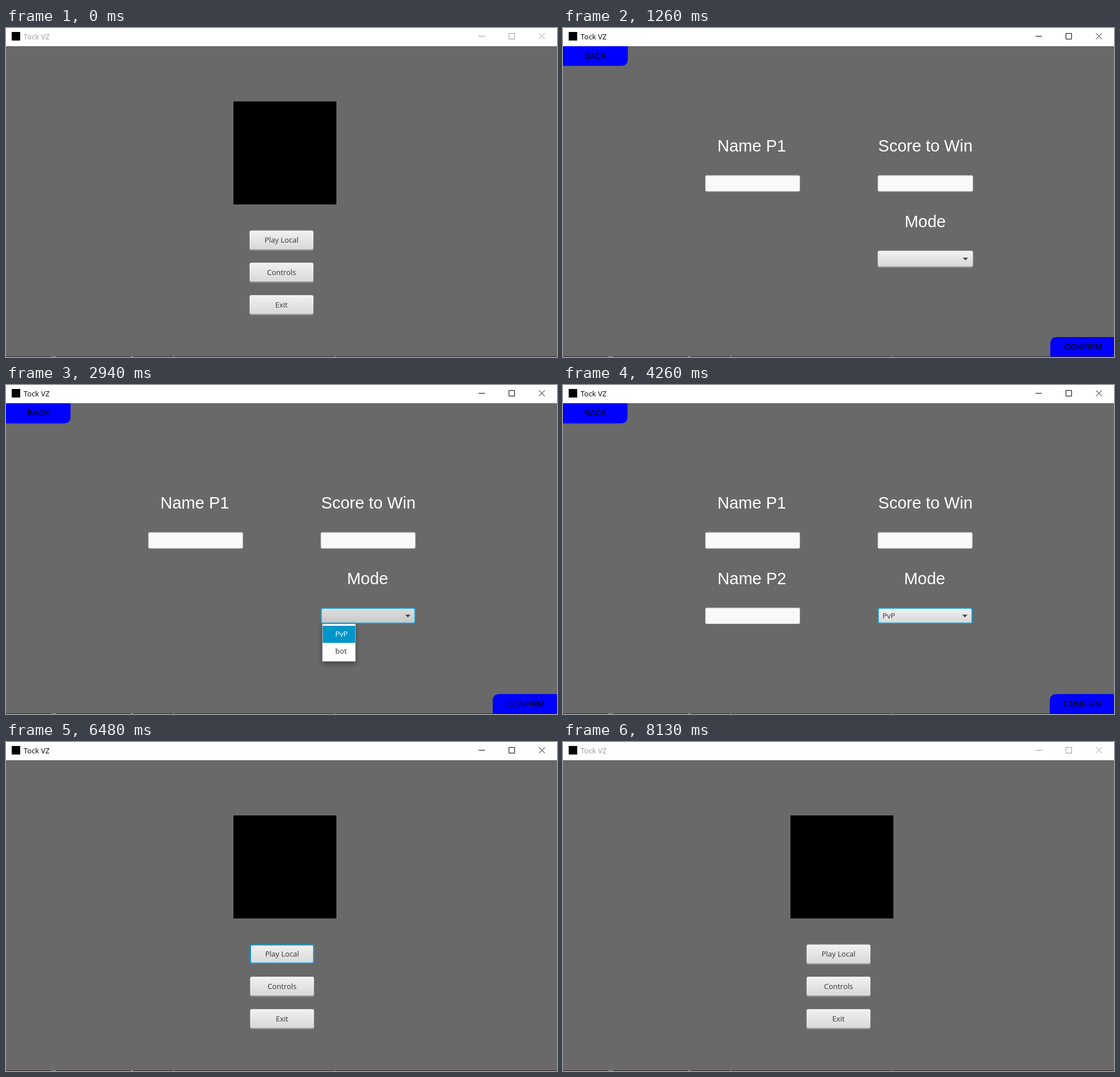
Write an HTML page that moves like this. It is 969 px wide and 578 px high and loops after 8.34 s.

```html
<!DOCTYPE html>
<html lang="en">
<head>
<meta charset="utf-8">
<title>Tock VZ</title>
<style>
  html, body { margin: 0; width: 100%; height: 100%; overflow: hidden; background: #696969; }
  svg { display: block; width: 969px; height: 578px; }
  text { font: 13px "Open Sans", "Noto Sans", sans-serif; fill: #333; }
  .mid { text-anchor: middle; }
  .label { font: 29px "Liberation Sans", Arial, sans-serif; fill: #fff; text-anchor: middle; }
  .corner { font: 14.3px "Liberation Sans", Arial, sans-serif; fill: #000; text-anchor: middle; }
</style>
</head>
<body>
<svg viewBox="0 0 969 578">
  <defs>
    <linearGradient id="normal" x2="0" y2="1"><stop stop-color="#f0f0f0"/><stop offset="1" stop-color="#d9d9d9"/></linearGradient>
    <linearGradient id="hover" x2="0" y2="1"><stop stop-color="#f2f2f2"/><stop offset="1" stop-color="#dcdcdc"/></linearGradient>
    <linearGradient id="pressed" x2="0" y2="1"><stop stop-color="#dcdcdc"/><stop offset="1" stop-color="#cacaca"/></linearGradient>
    <linearGradient id="rim" x2="0" y2="1"><stop stop-color="#fcfcfc"/><stop offset="1" stop-color="#e4e4e4"/></linearGradient>
    <linearGradient id="edge" x2="0" y2="1"><stop stop-color="#c4c4c4"/><stop offset="1" stop-color="#a9a9a9"/></linearGradient>
    <filter id="drop" x="-30%" y="-30%" width="160%" height="160%">
      <feDropShadow dx="0" dy="4" stdDeviation="4" flood-color="#000" flood-opacity=".4"/>
    </filter>
  </defs>
  <g id="stage"></g>
</svg>
<script>
const LOOP = 8340;
const stage = document.getElementById('stage');

// Each entry holds from its start time until the next one.
const scenes = [
  [0,    { screen: 'menu' }],
  [660,  { screen: 'menu', tone: 'hover' }],
  [1020, { screen: 'menu', active: true, focus: 'play', tone: 'pressed' }],
  [1260, { screen: 'setup', active: true, focus: 'back', nudge: 1 }],
  [1290, { screen: 'setup', active: true, focus: 'back' }],
  [2460, { screen: 'setup', active: true, focus: 'back', tone: 'hover' }],
  [2730, { screen: 'setup', active: true, focus: 'mode', tone: 'hover' }],
  [2940, { screen: 'setup', active: true, focus: 'mode', tone: 'pressed', open: true }],
  [4260, { screen: 'setup', active: true, focus: 'mode', mode: 'PvP' }],
  [6270, { screen: 'setup', active: true, focus: 'back', mode: 'PvP' }],
  [6480, { screen: 'menu', active: true, focus: 'play', nudge: 1 }],
  [6510, { screen: 'menu', active: true, focus: 'play' }],
  [8130, { screen: 'menu' }]
];

const rect = (x, y, w, h, fill, r = 0) =>
  `<rect x="${x}" y="${y}" width="${w}" height="${h}" rx="${r}" fill="${fill}"/>`;
const text = (x, y, str, cls = '', fill = '') =>
  `<text x="${x}" y="${y}" class="${cls}"${fill && ` style="fill:${fill}"`}>${str}</text>`;

function panel(x, y, w, h, tone = 'normal', focused = false) {
  if (focused) {
    return rect(x - .5, y - .5, w + 1, h + 1, 'rgba(3,158,211,.3)', 4) +
      rect(x + .3, y + .3, w - .6, h - .6, '#119fd0', 3) +
      rect(x + 2, y + 2, w - 4, h - 4, `url(#${tone})`, 1.5);
  }
  return rect(x, y + 1, w, h + .8, '#8f8f8f', 3.5) +
    rect(x, y, w, h, 'url(#edge)', 3.5) +
    rect(x + 1, y + 1, w - 2, h - 2, 'url(#rim)', 2.5) +
    rect(x + 2, y + 2, w - 4, h - 4, `url(#${tone})`, 2);
}

const field = (x, y, w) =>
  rect(x, y, w, 29, '#bdbdbd', 3) + rect(x + 1, y + 1, w - 2, 27, '#ececec', 2) +
  rect(x + 1, y + 2, w - 2, 26, '#f9f9f9', 2);

function chrome(active) {
  const ink = active ? '#000' : '#999';
  return rect(0, 0, 969, 32, '#fff') +
    rect(10, 7, 15, 15, '#000') +
    text(31, 20, 'Tock VZ', '', ink) +
    `<path d="M831 14.5h11M884.5 9.5h10v10h-10zM937.5 9.5l10 10m0-10l-10 10" fill="none" stroke="${ink}"/>`;
}

const desktopEdge = () =>
  rect(0, 577, 969, 1, '#30222a') +
  [[80, 8], [220, 4], [294, 2], [577, 2]].map(([x, w]) => rect(x, 577, w, 1, '#999')).join('');

function menu({ focus, tone, nudge = 0 }) {
  const x = 428 + nudge;
  const buttons = ['Play Local', 'Controls', 'Exit'].map((name, i) => {
    const y = [355.5, 412, 469][i];
    const first = i === 0;
    return panel(x, y, 113, 34, first ? tone : 'normal', first && focus === 'play') +
      text(x + 56.5, [377, 433.5, 490.5][i], name, 'mid');
  });
  return rect(400, 129, 181, 181, '#000') + buttons.join('');
}

function setup({ focus, tone, nudge = 0, mode, open }) {
  const back = focus === 'back' ? [114, 66.5] : [113.5, 67.5];
  const left = 856 + nudge;
  const w = 167 + nudge;
  const arrow = 702 + nudge;
  return `<path d="M0 32H${back[0]}V${back[1] - 12}q0 12 -12 12H0z" fill="#00f"/>` +
    text(57, 54, 'BACK', 'corner') +
    `<path d="M969 577H${left}V555q0 -12 12 -12H969z" fill="#00f"/>` +
    text(left + 57.3, 565, 'CONFIRM', 'corner') +
    text(332, 216.5, 'Name P1', 'label') + field(250, 258.5, 167) +
    text(637.3, 216.5, 'Score to Win', 'label') + field(553.3, 258.5, w) +
    text(635.9 + nudge, 349.5, 'Mode', 'label') +
    (mode ? text(332.3, 349.5, 'Name P2', 'label') + field(250, 391, 167) : '') +
    panel(553.3, 391, w, 28.5, tone, focus === 'mode') +
    `<path d="M${arrow} 403.5h9.4l-4.7 4.8z" fill="#444"/>` +
    (mode ? text(562, 410, mode) : '') +
    (open ? popup() : '');
}

const popup = () =>
  `<g filter="url(#drop)">${rect(556, 419.5, 59, 66.5, '#b8b8b8')}</g>` +
  rect(557, 420, 57, 65, '#fff') +
  rect(557, 423, 57, 30, '#0096c9') +
  text(579, 442, 'PvP', '', '#fff') + text(579, 472, 'bot');

let shown;
function frame(now) {
  const t = now % LOOP;
  const scene = scenes.findLast(([start]) => start <= t)[1];
  if (scene !== shown) {
    shown = scene;
    stage.innerHTML = rect(0, 0, 969, 578, '#696969') +
      (scene.screen === 'menu' ? menu(scene) : setup(scene)) +
      chrome(scene.active) + desktopEdge();
  }
  requestAnimationFrame(() => frame(performance.now() - begin));
}
const begin = performance.now();
frame(0);
</script>
</body>
</html>
```
